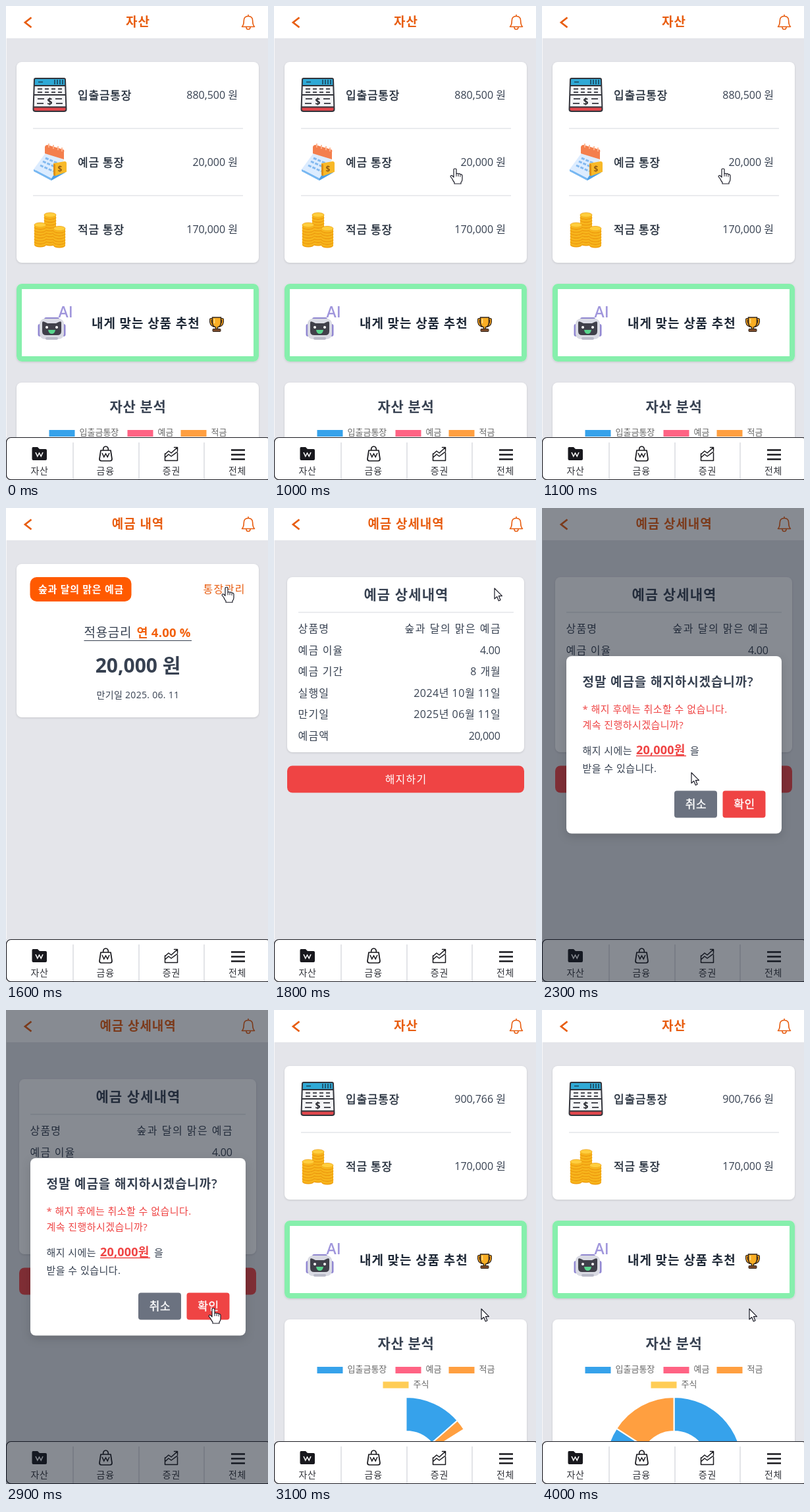
An HTML page that plays this animation: 398 px wide and 720 px high, repeating every 4100 ms.

```html
<!DOCTYPE html>
<html lang="ko">
<head>
<meta charset="utf-8">
<style>
html, body { margin: 0; width: 100%; height: 100%; overflow: hidden; background: #e4e5ea; }
svg { display: block; width: 398px; height: 720px; }
text { font-family: "Open Sans", "Noto Sans CJK KR", "Noto Sans CJK", sans-serif; white-space: pre; }
.card { fill: #fff; filter: drop-shadow(0 1px 1.5px #0002); }
.modal { fill: #fff; filter: drop-shadow(0 5px 7px #0002); }
</style>
</head>
<body>
<svg id="stage" viewBox="0 0 398 720"></svg>
<script>
const ORANGE = '#e85d10', INK = '#374151', RED = '#ef4444', PRODUCT = '숲과 달의 맑은 예금';
const LOOP = 4100, STEP = 100;
const SUMMARY = 1200, DETAILS = 1800, MODAL = 2300, CLOSED = 3100;

// ---------- markup helpers ----------
// Medium weight is a regular face with a hairline stroke.
const text = (x, y, s, size, { fill = INK, w = 400, ls = 0, a = 'start' } = {}) =>
  `<text x="${x}" y="${y}" font-size="${size}" fill="${fill}" font-weight="${w}" letter-spacing="${ls}" text-anchor="${a}"` +
  `${w === 500 ? ` stroke="${fill}" stroke-width=".35"` : ''}>${s}</text>`;
const box = (x, y, w, h, fill, r = 0, more = '') =>
  `<rect x="${x}" y="${y}" width="${w}" height="${h}" rx="${r}" fill="${fill}" ${more}/>`;
const card = (x, y, w, h, cls = 'card') => box(x, y, w, h, '#fff', 8, `class="${cls}"`);
const line = (d, color, w = 1, more = '') =>
  `<path d="${d}" fill="none" stroke="${color}" stroke-width="${w}" ${more}/>`;
const shape = (d, fill, more = '') => `<path d="${d}" fill="${fill}" ${more}/>`;
const group = (id, body, more = '') => `<g id="${id}" ${more}>${body}</g>`;
const round = 'stroke-linecap="round" stroke-linejoin="round"';

// ---------- icons ----------
const ledgerIcon =
  shape('M45 110H88Q90 110 90 112L91.500 157Q91.500 160 88 160H45Q41.500 160 41.500 157L43 112Q43 110 45 110Z', '#f4f5f7') +
  shape('M45 110H88Q90 110 90 112V121H43V112Q43 110 45 110Z', '#2fa9d6') +
  shape('M42 154H91V157Q91 160 88 160H45Q42 160 42 157Z', '#e0474c') +
  line('M45 110H88Q90 110 90 112L91.500 157Q91.500 160 88 160H45Q41.500 160 41.500 157L43 112Q43 110 45 110ZM43 121H90M42 135H91M42 153.500H91', '#33343b', 2) +
  line('M49 115.500H56M74 112V119M78 112V119M82 112V119M86 112V119', '#1d4358', 1.6) +
  line('M48 126H55M59 126H65M69 126H75M79 126H85M48 131H55M59 131H65M69 131H75M79 131H85M48 141H58M75 141H85M47 148H57M76 148H86', '#4a4b52', 1.8) +
  text(66.5, 150, '$', 14, { fill: '#25262c', w: 700, a: 'middle' });

const calendarIcon =
  shape('M43 149L69 163L90 151L63 137Z', '#4b9fe6') +
  shape('M42 146L61 120L88 132L69 160Z', '#dcecff') +
  shape('M42 146L69 160V163L42 149Z', '#78b8f2') +
  shape('M59 112Q60 109 63 109L87 116Q89 117 88 120V131L59 122Z', '#f47f4d') +
  line('M65 107V113M72 109V115M79 111V117M85 113V119', '#ffb48e', 1.8) +
  line('M60 129L81 138M56 134L76 143M52 140L72 149', '#83b9ef', 3, 'stroke-dasharray="5 2"') +
  shape('M72 137L89 134Q92 134 92 137V150L75 156Q72 156 72 153Z', '#f8b928') +
  shape('M72 137L75 139V156Q72 156 72 153Z', '#df8f18') +
  text(82, 150, '$', 12, { fill: '#945d13', w: 700, a: 'middle' });

const stack = (x, base, n) => Array.from({ length: n }, (_, i) => {
  const y = base - i * 4.4;
  return shape(`M${x - 9} ${y}v4a9 3.500 0 0 0 18 0v-4z`, '#f0a010') +
    shape(`M${x - 9} ${y}v2a9 3.500 0 0 0 18 0v-2z`, '#fbbd20') +
    `<ellipse cx="${x}" cy="${y}" rx="9" ry="3.500" fill="#ffce3d" stroke="#eda014" stroke-width=".8"/>`;
}).join('');
const coinsIcon = stack(67, 153, 10) + stack(52, 155, 7) + stack(81, 156, 6);

const robotIcon =
  text(79.5, 473, 'AI', 23, { fill: '#a096dc', w: 600 }) +
  box(48.5, 483, 8, 19, '#9187d2', 3) + box(82.5, 483, 8, 19, '#9187d2', 3) +
  box(58, 473, 23, 6, '#8f86cf', 3) +
  box(51, 475, 37, 31, '#d9dae3', 8) + box(60, 503, 19, 4, '#b9bac8', 2) +
  shape('M55 481Q55 478 59 480L63 482H76L80 480Q84 478 84 481V494Q84 500 78 500H61Q55 500 55 494Z', '#40404a') +
  '<circle cx="62" cy="488" r="2" fill="#fff"/><circle cx="77" cy="488" r="2" fill="#fff"/>' +
  shape('M64 492H75Q74 498 69.500 498Q65 498 64 492Z', '#58d68d');

const trophyIcon =
  line('M314 476H311Q310 484 316 486M326 476H329Q330 484 324 486', '#33261c', 4, round) +
  line('M314 476H311Q310 484 316 486M326 476H329Q330 484 324 486', '#f7a21b', 1.6, round) +
  shape('M313.500 473H326.500V481Q326 487 321.500 488V491H318.500V488Q314 487 313.500 481Z', '#faae24', 'stroke="#33261c" stroke-width="1.500"') +
  line('M316.500 475V482', '#ffe08a', 1.6) + box(314, 490.5, 12, 4, '#7a4a2b', 1, 'stroke="#33261c"');

// ---------- screens ----------
const header = box(0, 0, 398, 49, '#fff') +
  line('M38.500 17.500L29 25L38.500 32.500', ORANGE, 2.8) +
  line('M368 13.500V15.500M358.500 31.500H377.500C375 29 374.700 27 374.700 22.500C374.700 18 372 15.500 368 15.500C364 15.500 361.300 18 361.300 22.500C361.300 27 361 29 358.500 31.500ZM365 32Q365 35.500 368 35.500Q371 35.500 371 32', ORANGE, 1.6, round) +
  `<text id="title" x="200.500" y="31" font-size="19" font-weight="700" letter-spacing=".9" text-anchor="middle" fill="${ORANGE}"></text>`;

const won = 'M45 678L47.800 684L50.500 679L53.200 684L56 678';
const nav = box(.5, 655.5, 402, 64, '#fff', 7, 'stroke="#1b1b22" stroke-width="1.200"') +
  [102, 202, 301].map(x => box(x - 1, 663, 2, 56, '#e3e4e8')).join('') +
  ['자산', '금융', '증권', '전체'].map((s, i) => text(51 + 100.2 * i, 711, s, 14, { fill: '#33353b', ls: .7, a: 'middle' })).join('') +
  shape('M41 670H48L51 673H60Q62 673 62 675V688Q62 690 60 690H41.500Q39.500 690 39.500 688V672Q39.500 670 41 670Z', '#18181d') +
  line(won, '#fff', 1.5) +
  line('M144 675H159L161 688Q161 691 158 691H145Q142 691 142 688ZM147.500 675Q147.500 669 151.500 669Q155.500 669 155.500 675', '#18181d', 1.7, round) +
  line(won, '#18181d', 1.5, 'transform="translate(101 1)"') +
  line('M241.500 680V690.500H260.500V679M241.500 681L247 676L251 679L260 671M255.500 670.500H260.500V675.500M241.500 686L247 681L251 684L260.500 677', '#18181d', 1.5, round) +
  line('M342 674.500H363M342 681.500H363M342 688.500H363', '#18181d', 2.5);

const account = (icon, name, id, amount, more) => group(id, icon +
  text(109, 141.5, name, 17, { w: 500, ls: .8, fill: '#1f2937' }) +
  `<text id="${id}Sum" x="352" y="141" font-size="16" text-anchor="end" fill="${INK}">${amount} 원</text>`, more);

const legend = [['입출금통장', '#36a2eb', 65, 648], ['예금', '#ff6384', 184, 648], ['적금', '#ff9f40', 265, 648], ['주식', '#ffcd56', 165, 670.5]]
  .map(([s, c, x, y]) => box(x + .5, y - 4, 39, 10, c) + text(x + 46.5, y + 4, s, 13, { fill: '#666' })).join('');

const home =
  '<rect id="accounts" class="card" x="16" y="85" width="368" rx="8"/>' +
  line('M41 186H360', '#e3e5e9', 1.4) +
  account(ledgerIcon, '입출금통장', 'cash', '880,500') +
  group('deposit', line('M41 288H360', '#e3e5e9', 1.4) +
    account(calendarIcon, '예금 통장', 'fixed', '20,000', 'transform="translate(0 102)"')) +
  account(coinsIcon, '적금 통장', 'saving', '170,000') +
  group('lower',
    card(16, 422, 368, 118) + box(20, 426, 360, 110, '#fff', 4, 'stroke="#86efac" stroke-width="8"') +
    robotIcon + text(130, 488.5, '내게 맞는 상품 추천', 19, { w: 600, ls: .9, fill: '#1f2937' }) + trophyIcon +
    card(16, 572, 368, 400) +
    text(200.5, 615.5, '자산 분석', 21, { w: 600, ls: .7, a: 'middle' }) + legend +
    '<path id="cashArc" fill="#36a2eb" stroke="#fff" stroke-width="2"/><path id="savingArc" fill="#ff9f40" stroke="#fff" stroke-width="2"/>');

const summary = card(16, 85, 368, 233) +
  box(36.5, 105, 154, 37, '#ff5a00', 10) +
  text(114, 129, PRODUCT, 15, { fill: '#fff', w: 600, ls: .7, a: 'middle' }) +
  text(299.5, 129, '통장관리', 16, { fill: ORANGE, ls: 1.4 }) +
  text(118.5, 196, '적용금리', 19, { ls: .7 }) + text(198.5, 196, '연 4.00 %', 18.5, { fill: '#f2600c', w: 700, ls: .25 }) +
  line('M118.500 201.500H282', INK, 1.2) +
  text(200.5, 250, '20,000 원', 30, { w: 700, a: 'middle' }) +
  text(200.5, 289, '만기일 2025. 06. 11', 14, { ls: .3, a: 'middle' });

const details = card(20, 105, 360, 266) +
  text(201, 138.5, '예금 상세내역', 21, { w: 600, ls: 1.1, a: 'middle' }) + line('M37 158.500H364', '#e3e5e9', 1.4) +
  [['상품명', PRODUCT, 1.5], ['예금 이율', '4.00', -.3], ['예금 기간', '8 개월', .9], ['실행일', '2024년 10월 11일', .5],
   ['만기일', '2025년 06월 11일', .5], ['예금액', '20,000', -.3]].map(([k, v, ls], i) =>
    text(36.5, 189 + 32.6 * i, k, 16, { ls: 1.2 }) + text(343.8 + ls, 189 + 32.6 * i, v, 16, { ls, a: 'end' })).join('') +
  box(20, 391.5, 360, 41, RED, 8) + text(200.5, 418, '해지하기', 16, { fill: '#fff', ls: 1.2, a: 'middle' });

const body = { ls: .45 }, warn = { ls: .45, fill: RED };
const modal = box(0, 0, 398, 720, '#111827', 0, 'opacity=".5"') + card(37, 225, 327, 269.5, 'modal') +
  text(61.5, 271, '정말 예금을 해지하시겠습니까?', 19, { w: 600, ls: .9 }) +
  text(61.5, 310.5, '* 해지 후에는 취소할 수 없습니다.', 15, warn) + text(61.5, 335, '계속 진행하시겠습니까?', 15, warn) +
  text(61.5, 374, '해지 시에는', 15, body) + text(143, 374, '20,000원', 18, { fill: RED, w: 700, ls: .2 }) +
  line('M143 376.500H219', RED, 1.5) + text(225, 374, '을', 15, body) + text(61.5, 400.5, '받을 수 있습니다.', 15, body) +
  [[201, '#6b7280', '취소'], [274.5, RED, '확인']].map(([x, c, s]) =>
    box(x, 429.5, 65, 41, c, 4) + text(x + 33, 456, s, 17, { fill: '#fff', w: 500, ls: .7, a: 'middle' })).join('');

const outline = 'stroke="#1c1d28" stroke-width="1.200" stroke-linejoin="round"';
const cursor =
  group('arrow', shape('M0 0V16L3.700 12.600L6.300 19L9 17.800L6.400 11.600H11.500Z', '#fff', outline)) +
  group('hand', shape('M-2 1Q-2-1 0-1Q2-1 2 1V7Q3 5.500 5 7Q6.500 6 8 7.700Q11 7.500 11 10V15Q11 18 9 20V22H-1V20Q-3 18-4 15L-7 11Q-6.500 8.500-4 10L-2 12Z', '#fff', outline) +
    line('M2 7V11M5 7.500V11M8 8.500V11.500', '#1c1d28', 1));

const $ = id => document.getElementById(id);
$('stage').innerHTML = box(0, 0, 398, 720, '#e4e5ea') + box(0, 0, 1, 655, '#f8f8fa') +
  group('home', home) + group('summary', summary) + group('details', details) +
  header + nav + group('modal', modal) + group('cursor', cursor);

// ---------- timeline ----------
const screens = [[0, 'home', '자산'], [SUMMARY, 'summary', '예금 내역'], [DETAILS, 'details', '예금 상세내역'], [CLOSED, 'home', '자산']];
const path = [[700, 330, 640], [1000, 275, 248], [SUMMARY, 275, 248], [1500, 335, 121], [DETAILS, 335, 122],
  [2100, 227, 402], [2500, 227, 402], [2800, 315, 454], [LOOP, 315, 454]];
const hovers = [[900, SUMMARY], [1500, DETAILS], [2100, MODAL], [2700, CLOSED]];

const show = (id, on) => $(id).setAttribute('display', on ? 'inline' : 'none');
const within = (t, [a, b]) => t >= a && t < b;
const move = (id, x, y) => $(id).setAttribute('transform', `translate(${x} ${y})`);

function ring(id, from, to) {
  const at = (r, turn) => `${200.5 + r * Math.sin(turn * 2 * Math.PI)} ${794 - r * Math.cos(turn * 2 * Math.PI)}`;
  const big = to - from > .5 ? 1 : 0;
  $(id).setAttribute('d', `M${at(104, from)}A104 104 0 ${big} 1 ${at(104, to)}L${at(52, to)}A52 52 0 ${big} 0 ${at(52, from)}Z`);
}

function render(t) {
  const [, screen, title] = screens.findLast(s => t >= s[0]);
  for (const id of ['home', 'summary', 'details']) show(id, id === screen);
  $('title').textContent = title;
  show('modal', within(t, [MODAL, CLOSED]));

  const closed = t >= CLOSED, shift = closed ? 102 : 0;
  $('accounts').setAttribute('height', 305 - shift);
  show('deposit', !closed);
  $('cashSum').textContent = (closed ? '900,766' : '880,500') + ' 원';
  move('saving', 0, 204 - shift);
  move('lower', 0, -shift);

  const p = Math.min(1, Math.max(0, (t - CLOSED + 43) / 1000));
  const grown = Math.min(.99999, 1 - (1 - p) ** 4), share = 900766 / 1070766;
  ring('cashArc', 0, share * grown);
  ring('savingArc', share * grown, grown);

  show('cursor', t >= path[0][0]);
  const i = Math.max(1, path.findIndex(k => k[0] > t));
  const [t0, x0, y0] = path[i - 1], [t1, x1, y1] = path[i];
  const u = Math.max(0, (t - t0) / (t1 - t0)), e = u * u * (3 - 2 * u);
  move('cursor', x0 + (x1 - x0) * e, y0 + (y1 - y0) * e);
  const hand = hovers.some(h => within(t, h));
  show('hand', hand);
  show('arrow', !hand);
}

function tick() {
  render(Math.floor(performance.now() % LOOP / STEP) * STEP);
  requestAnimationFrame(tick);
}
tick();
</script>
</body>
</html>
```
